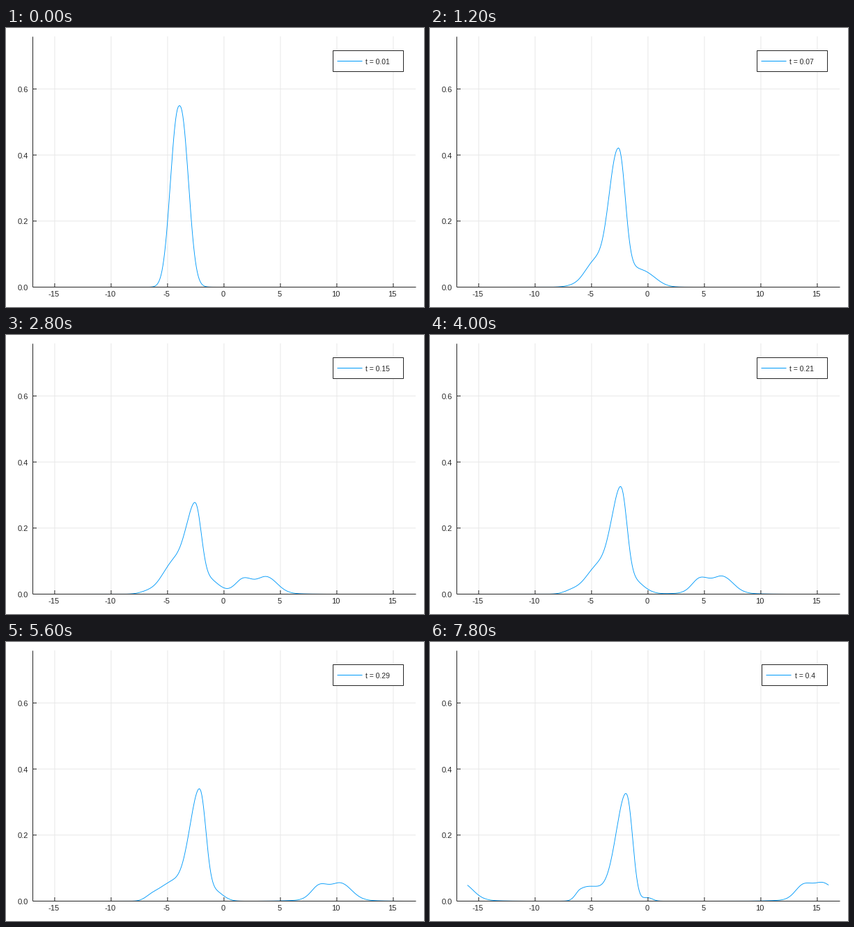
These frames come from a looping animation (600x400 px, 8 s). A matplotlib script:

```python
import numpy as np
import matplotlib.pyplot as plt
from matplotlib.animation import FuncAnimation
from matplotlib.patches import Rectangle

W, H, DPI = 600, 400, 100
LEFT, RIGHT, TOP, BASE = 38, 588, 12, 371
X0, X_UNIT, Y_UNIT = 312.9, 16.2, 473.5   # pixel of x = 0, pixels per unit
PERIOD = 32 * X_UNIT
PX = 72 / DPI
BLUE, INK, FRAME, GRID = "#009afa", "#262626", "#262626", "#e8e8e8"
FRAMES, INTERVAL = 40, 200


def ease(t, start, end):
    u = np.clip((t - start) / (end - start), 0, 1)
    return u * u * (3 - 2 * u)


def lobe(x, c, h, wl, wr, pl=2.0, pr=2.0):
    """Peak of height h at c with separate left and right width and power."""
    d = x - c
    left = np.exp(-(np.maximum(-d, 0) / wl) ** pl)
    right = np.exp(-(np.maximum(d, 0) / wr) ** pr)
    return h * left * right


def bell(x, c, h, sl, sr):
    return lobe(x, c, h, sl * np.sqrt(2), sr * np.sqrt(2))


def trapped(x, t):
    """The packet that leans against the barrier and slowly sharpens."""
    spread = ease(t, 0.01, 0.15)
    late = ease(t, 0.20, 0.39)
    center = 249 + 20.5 * ease(t, 0.01, 0.07) + 11.5 * ease(t, 0.12, 0.40)
    swell = np.sin(np.pi * max(t - 0.15, 0) / 0.36)
    height = 260 - 140 * ease(t, 0.01, 0.125) + 42 * swell
    main = lobe(x, center, height, 17 + 4 * spread,
                17 - 4 * ease(t, 0.01, 0.09), 2.25 - 0.4 * spread, 2.25)
    shoulder = bell(x, 236, 35 * ease(t, 0.01, 0.07) - 20 * ease(t, 0.13, 0.40),
                    14, 13)
    foot = bell(x, 206 + 10 * late, 31 * (t - 0.01), 12 - 5 * late, 13)
    knee = bell(x, 286 + 26 * late, 24 * ease(t, 0.01, 0.08) - 19 * late,
                12 - 5 * late, 17 - 10 * late)
    return main + shoulder + foot + knee


def escaped(x, t):
    """The double bump that travels right at an almost constant speed."""
    trail, lead = 224 + 780 * t, 259.4 + 764 * t
    return (bell(x, trail, 20 * ease(t, 0.04, 0.14), 11.5, 12.5)
            + bell(x, lead, 22.5 * ease(t, 0, 0.12), 13.5, 15)
            + bell(x, (trail + lead) / 2, 3 * ease(t, 0.03, 0.20), 36, 36))


def wave(t):
    """Height of the curve in pixels, wrapped around the periodic domain."""
    return sum(trapped(x, t) + escaped(x, t) for x in (xs, xs + PERIOD))


plt.rcParams["font.family"] = "Liberation Sans"
fig = plt.figure(figsize=(W / DPI, H / DPI), dpi=DPI, facecolor="white")
ax = fig.add_axes([0, 0, 1, 1])
ax.set_xlim(0, W)
ax.set_ylim(H, 0)
ax.axis("off")


def stroke(x, y, color=FRAME, z=4, **style):
    return ax.plot(x, y, color=color, lw=PX, zorder=z,
                   solid_capstyle="butt", **style)[0]


def label(x, y, s, ha, size=8):
    return ax.text(x, y, s, ha=ha, va="baseline", fontsize=size, color=INK,
                   zorder=8)


for n in range(-15, 16, 5):
    x = X0 + n * X_UNIT
    stroke([x, x], [TOP, BASE], GRID, 1, snap=False)
    stroke([x, x], [BASE - 5, BASE], snap=False)
    label(x - 1.2, 385, str(n), "center")
for n in range(4):
    y = BASE + 0.5 - 0.2 * n * Y_UNIT
    if n:
        stroke([LEFT, RIGHT], [y, y], GRID, 1, snap=False)
        stroke([LEFT, LEFT + 6], [y, y], snap=False)
    label(32, y + 4.5, f"{0.2 * n:.1f}", "right")
stroke([LEFT, LEFT], [TOP, BASE])
stroke([LEFT, RIGHT], [BASE, BASE])

xs = np.linspace(X0 - PERIOD / 2, X0 + PERIOD / 2, 400)
curve = stroke(xs, np.full_like(xs, BASE), BLUE, 3)
curve.set_linewidth(0.9 * PX)
box = ax.add_patch(Rectangle((469, 32), 101, 30, fc="white", ec=FRAME,
                             lw=PX, zorder=6))
sample = stroke([476, 511], [47, 47], BLUE, 7)
caption = label(517, 52, "", "left", 7.5)


def draw(i):
    t = round(0.01 * (i + 1), 2)
    curve.set_ydata(BASE + 0.5 - wave(t))
    text = f"t = {t:g}"
    left = 469 if len(text) > 7 else 476
    box.set_x(left)
    box.set_width(570 - left)
    sample.set_xdata([left + 6, left + 42])
    caption.set_x(left + 47.5)
    caption.set_text(text)
    return curve, box, sample, caption


anim = FuncAnimation(fig, draw, frames=FRAMES, interval=INTERVAL,
                     repeat=True, repeat_delay=0)
plt.show()
```
